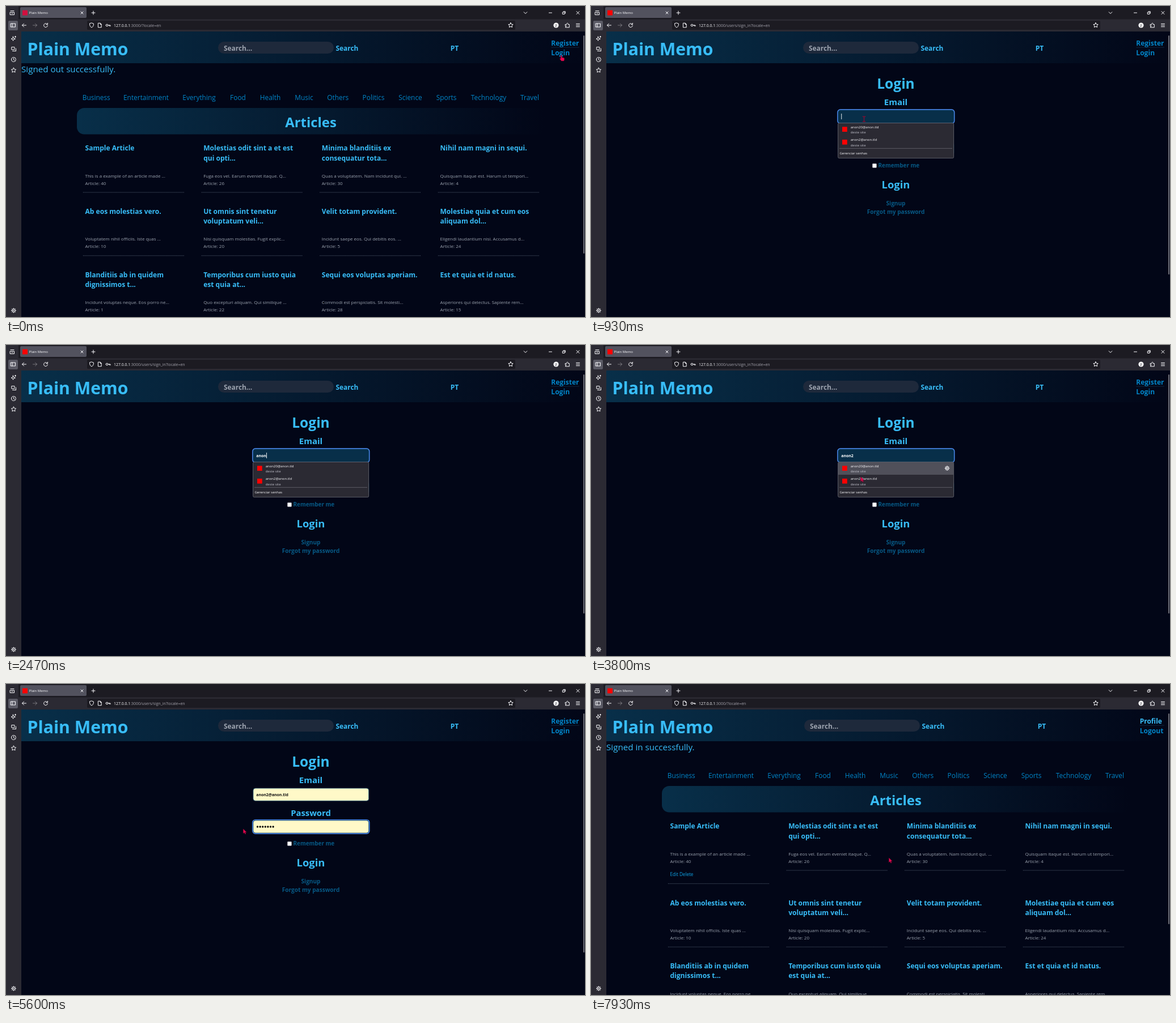
These frames come from a looping animation (1021 px wide and 549 px high, 8000 ms). An HTML page:

```html
<!DOCTYPE html>
<html lang="en">
<head>
<meta charset="utf-8">
<title>Plain Memo</title>
<style>
html, body { margin: 0; width: 100%; height: 100%; overflow: hidden; background: #020617; }
svg { display: block; width: 1021px; height: 549px; }
text { font-family: "Open Sans", "Noto Sans", sans-serif; white-space: pre; }
.b { font-weight: 700; }
.m { text-anchor: middle; }
.i { fill: none; stroke: #fbfbfe; stroke-width: 1; stroke-linecap: round; stroke-linejoin: round; }
</style>
</head>
<body>
<svg id="stage" viewBox="0 0 1021 549" xmlns="http://www.w3.org/2000/svg"></svg>
<script>
const LOOP = 8000;
const SKY = '#38bdf8', LINK = '#0284c7', DEEP = '#075985', GREY = '#9ca3af';
const BAR = '#2b2a33', DARK = '#1c1b22', WHITE = '#fbfbfe';

const text = (x, y, s, size, fill, cls = '') =>
  `<text x="${x}" y="${y}" font-size="${size}" fill="${fill}" class="${cls}">${s}</text>`;
const rect = (x, y, w, h, fill, r = 0, more = '') =>
  `<rect x="${x}" y="${y}" width="${w}" height="${h}" rx="${r}" fill="${fill}" ${more}/>`;
const icon = (x, y, d, more = '') =>
  `<path class="i" transform="translate(${x} ${y})" d="${d}" ${more}/>`;
const group = (id, body, more = '') => `<g id="${id}" ${more}>${body}</g>`;
const circle = (r, x = 0, y = 0) => `M${x - r} ${y}a${r} ${r} 0 1 0 ${2 * r} 0a${r} ${r} 0 1 0 ${-2 * r} 0`;

function star(r) {
  let d = '';
  for (let k = 0; k < 10; k++) {
    const a = k * Math.PI / 5 - Math.PI / 2, q = k % 2 ? r * 0.5 : r;
    d += (k ? 'L' : 'M') + (q * Math.cos(a)).toFixed(2) + ' ' + (q * Math.sin(a)).toFixed(2);
  }
  return d + 'Z';
}

function gear(x, y) {
  let d = circle(1.3) + circle(3);
  for (let k = 0; k < 8; k++) {
    const c = Math.cos(k * Math.PI / 4), s = Math.sin(k * Math.PI / 4);
    d += `M${3 * c} ${3 * s}L${4 * c} ${4 * s}`;
  }
  return icon(x, y, d, 'stroke-width=".8"');
}

function browser() {
  return rect(0, 0, 1021, 24, DARK) + rect(0, 0, 22, 24, BAR) +
    rect(0, 23.5, 1021, 21.5, BAR) + rect(0, 23.5, 27, 526, BAR) +
    rect(25, 2, 117, 19, '#52525e', 2) + rect(143, 26, 755, 16, DARK, 2) +
    rect(4, 26, 17, 17, '#5b5b66', 2) +
    rect(29, 7.5, 9, 9, '#f00', 0, 'id="favicon"') +
    text(40.5, 14.2, 'Plain Memo', 6.05, WHITE) +
    icon(11, 12, 'M-3.5 -1H3.5V3.5H-3.5ZM-3 -3.5H3M-1 1H1') +
    icon(12.5, 34, 'M-4 -3H4V3H-4ZM-1.5 -3V3') +
    icon(134, 12, 'M-2 -2L2 2M2 -2L-2 2') +
    icon(154, 12, 'M-3 0H3M0 -3V3') +
    icon(916, 12, 'M-2.8 -1.3L0 1.5L2.8 -1.3') +
    icon(960, 12, 'M-2.5 0H2.5') +
    icon(984, 12, 'M-2.3 -1H1V2.3H-2.3ZM-1 -2.3H2.3V1') +
    icon(1008.5, 12, 'M-2.5 -2.5L2.5 2.5M2.5 -2.5L-2.5 2.5') +
    icon(32, 34, 'M3.5 0H-3.5M-.5 -3L-3.5 0L-.5 3') +
    icon(51, 34, 'M-3.5 0H3.5M.5 -3L3.5 0L.5 3', 'opacity=".35"') +
    icon(70, 34, 'M2.8 -1.8A3.4 3.4 0 1 0 3.4 .6M3.4 -3.8V-1.3H.9') +
    icon(151, 34, 'M0 -4L3.5 -2.8C3.5 1 2.5 2.7 0 4C-2.5 2.7 -3.5 1 -3.5 -2.8Z') +
    icon(165.5, 34, 'M-2.7 -3.8H.8L2.7 -1.8V3.8H-2.7ZM.6 -3.6V-1.6H2.6') +
    icon(180, 34, circle(1.8, -2) + 'M0 0H4V1.6M2.3 0V1.4') +
    icon(890, 34, star(4.4)) +
    `<circle cx="970" cy="34" r="4.6" fill="${WHITE}"/>` +
    text(970, 36.2, 'J', 6, DARK, 'b m') +
    icon(990, 34, 'M-3.5 -1.5H-1.2C-2 -4.5 2 -4.5 1.2 -1.5H3.3V3.8H-3.5V2C-1 2.3 -1 .2 -3.5 .6Z') +
    icon(1008.5, 34, 'M-3 -2.6H3M-3 0H3M-3 2.6H3') +
    icon(13.5, 57, 'M-1 -3L0 0L3 1L0 2L-1 4.3L-2 2L-4.3 1L-2 0ZM3 -3.8V-1.6M1.9 -2.7H4.1') +
    icon(14, 76, 'M-3.8 -3.5H1V1H-3.8ZM3.5 -1V3.5H-2.5M-1.5 3.5H3.5') +
    icon(13.5, 94.5, circle(3.9) + 'M0 -2.2V.3L1.6 1.2') +
    icon(13.5, 113.5, star(4.4)) +
    gear(13.5, 537.5);
}

function header(user) {
  const d = user ? 2 : 0, [first, second] = user ? ['Profile', 'Logout'] : ['Register', 'Login'];
  const x = user ? 967.7 : 961.3;
  return rect(27, 45, 994, 56, 'url(#fade)') +
    text(37.5, 87, 'Plain Memo', 30.2, SKY, 'b') +
    rect(374 + d, 63, 204, 21, '#1e293b', 10.5) +
    text(384 + d, 78.8, 'Search...', 11.9, GREY, 'b') +
    text(581.5 + d, 78.8, 'Search', 11.9, SKY, 'b') +
    text(user ? 787.7 : 783.7, 78.8, 'PT', 12, SKY, 'b') +
    text(x, 69.9, first, 12, user ? SKY : LINK, 'b') +
    rect(x, 72.6, 1011 - x, 0.7, '#17344c') +
    text(x, 87.3, second, 12.1, LINK, 'b');
}

const scrollbar = end => rect(1018, 52, 2, end - 52, '#6f7079', 1);

const TOPICS = { Business: 159.3, Entertainment: 247, Everything: 340.5, Food: 409, Health: 466,
  Music: 525.5, Others: 585.3, Politics: 648, Science: 713, Sports: 776.5, Technology: 851, Travel: 923.5 };

// title lines | excerpt | article number
const CARDS = [
  'Sample Article||This is a example of an article made ...|40',
  'Molestias odit sint a et est|qui opti...|Fuga eos vel. Earum eveniet itaque. Q...|26',
  'Minima blanditiis ex|consequatur tota...|Quas a voluptatem. Nam incidunt qui. ...|30',
  'Nihil nam magni in sequi.||Quisquam itaque est. Harum ut tempori...|4',
  'Ab eos molestias vero.||Voluptatem nihil officiis. Iste quas ...|10',
  'Ut omnis sint tenetur|voluptatum veli...|Nisi quisquam molestias. Fugit explic...|20',
  'Velit totam provident.||Incidunt saepe eos. Qui debitis eos. ...|5',
  'Molestiae quia et cum eos|aliquam dol...|Eligendi laudantium nisi. Accusamus d...|24',
  'Blanditiis ab in quidem|dignissimos t...|Incidunt voluptas neque. Eos porro ne...|1',
  'Temporibus cum iusto quia|est quia at...|Quo excepturi aliquam. Qui similique ...|22',
  'Sequi eos voluptas aperiam.||Commodi est perspiciatis. Sit molesti...|28',
  'Est et quia et id natus.||Asperiores qui delectus. Sapiente rem...|15'
];

function card(s, k, user) {
  const [a, b, excerpt, n] = s.split('|');
  const row = Math.floor(k / 4), x = 139.5 + k % 4 * 208.65;
  const y = row * 111.75 + (user && row ? 23.4 : 0);
  const own = user && k === 0, line = y + 329 + (own ? 23.4 : 0);
  return text(x, y + 255.4, a, 12.05, SKY, 'b') + text(x, y + 272.5, b, 12.05, SKY, 'b') +
    text(x, y + 302.7, excerpt, 8, GREY) + text(x, y + 315.5, 'Article: ' + n, 8, GREY) +
    (own ? text(x, 338.9, 'Edit Delete', 8.1, '#0ea5e9') : '') +
    `<path d="M${x - 3.5} ${line}h178" stroke="#586577" stroke-width="1" stroke-dasharray="1 1.13"/>`;
}

const home = user => header(user) +
  text(27, 117.2, user ? 'Signed in successfully.' : 'Signed out successfully.', 15.15, SKY) +
  Object.entries(TOPICS).map(([s, x]) => text(x, 166, s, 11.9, LINK, 'm')).join('') +
  rect(125, 180, 825, 46.5, 'url(#fade)', 13) +
  text(537.5, 213.6, 'Articles', 23.9, SKY, 'b m') +
  CARDS.map((s, k) => card(s, k, user)).join('') +
  scrollbar(user ? 424 : 437);

const field = (id, y) =>
  rect(435.9, y, 203.8, 22.3, '#082f49', 4, `id="${id}" stroke="#0c4a6e" stroke-width=".8"`) +
  rect(434.8, y - 1.2, 206, 24.7, 'none', 5, `id="${id}Ring" stroke="#4f8ff7" stroke-width="1.4"`);

function bullets() {
  let s = '';
  for (let k = 0; k < 7; k++) s += `<circle cx="${443.5 + k * 4.6}" cy="252" r="1.65"/>`;
  return group('dots', s);
}

const login = () => header(false) +
  text(537.5, 145.8, 'Login', 24.5, SKY, 'b m') +
  text(537.5, 174.6, 'Email', 15, SKY, 'b m') +
  field('email', 184) +
  text(441.3, 197.8, '', 6.9, '#fff', 'b').replace('<text', '<text id="value"') +
  rect(0, 190, 0.9, 10, '#fff', 0, 'id="caret"') +
  text(537.5, 233, 'Password', 14.8, SKY, 'b m') +
  field('pass', 240.8) + bullets() +
  rect(496.3, 278.3, 7.2, 7.2, '#fff', 1.2, 'stroke="#8f8f9d" stroke-width=".6"') +
  text(506.5, 285.1, 'Remember me', 9.95, DEEP, 'b') +
  text(537.5, 321.8, 'Login', 18.4, SKY, 'b m') +
  text(537.5, 351.6, 'Signup', 10.1, DEEP, 'b m') +
  text(537.5, 366.6, 'Forgot my password', 10.1, DEEP, 'b m') +
  scrollbar(474);

const option = (y, s) => rect(443, y + 6.8, 8.7, 8.7, '#f00') +
  text(457.7, y + 9, s, 6, WHITE) + text(457.7, y + 18.6, 'deste site', 6, '#bfbfc9');

const menu = () =>
  rect(435.6, 206.6, 204, 62, BAR, 2, 'stroke="#65656f" stroke-width=".9"') +
  group('hover', rect(436, 207, 203.2, 22, '#50505a') + gear(628, 217.5)) +
  option(206.5, 'anon20@anon.tld') + option(229.1, 'anon2@anon.tld') +
  rect(438, 250.9, 199, 0.8, '#65656f') +
  text(438.5, 262, 'Gerenciar senhas', 6, WHITE);

const PINK = '#e8064f';
const pointers =
  group('arrow', '<path d="M0 0V8.2L2 6.5L3.4 9.4L4.8 8.8L3.4 6H6Z"/>', `fill="${PINK}" stroke="#5c0a26" stroke-width=".4"`) +
  group('hand', '<path d="M-1.3 .8Q-.4 -.4 .5 .8V4L4.2 5Q5.6 5.6 5.2 7.5L4.4 10.6H-.2L-3 6.8Q-2.6 5.5 -1.3 6.6Z"/>', `fill="${PINK}" stroke="#5c0a26" stroke-width=".4"`) +
  group('beam', '<path d="M-2.7 -4.3H-.8L0 -3.7L.8 -4.3H2.7M0 -3.7V3.9M-2.7 4.4H-.8L0 3.9L.8 4.4H2.7"/>', 'fill="none" stroke="#7d1034" stroke-width="1.5"');

const stage = document.getElementById('stage');
stage.innerHTML =
  `<defs><linearGradient id="fade"><stop stop-color="#082f49"/><stop offset="1" stop-color="#020617"/></linearGradient></defs>` +
  rect(0, 0, 1021, 549, '#020617') +
  group('out', home(false)) + group('form', login()) + group('in', home(true)) +
  browser() +
  `<text x="190" y="36.8" font-size="6.93" fill="${WHITE}">127.0.0.1<tspan id="path" fill="#a3a2ab"></tspan></text>` +
  rect(27, 45, 0, 2, '#1c6fd6', 0, 'id="load"') +
  group('status', rect(27, 538, 114.5, 11, BAR, 1, 'stroke="#4a4953" stroke-width=".7"') +
    text(29.5, 546, '127.0.0.1:3000/users/sign_in?locale=en', 6.05, '#d0d0d6')) +
  group('menu', menu()) +
  group('pointer', pointers);

const el = {};
stage.querySelectorAll('[id]').forEach(n => el[n.id] = n);
const show = (id, on) => el[id].setAttribute('display', on ? 'inline' : 'none');
const set = (id, name, v) => el[id].setAttribute(name, v);
const within = (t, a, b) => t >= a && t < b;

// time, x, y of the pointer
const TRACK = [
  [470, 979.5, 86.5], [800, 481.5, 199.5], [3690, 481.5, 205], [3800, 475.7, 232.7],
  [3930, 481.5, 245.5], [4330, 481.5, 245.5], [4530, 489, 252], [5140, 489, 252],
  [5400, 415.5, 249.5], [5540, 415.5, 249.5], [5730, 427, 275], [6010, 427, 275],
  [6330, 543.7, 314], [7810, 543.7, 314], [7930, 525.3, 306.8]
];

function pointerAt(t) {
  const k = TRACK.findIndex(p => p[0] > t);
  if (k === 0) return TRACK[0].slice(1);
  if (k < 0) return TRACK[TRACK.length - 1].slice(1);
  const [a, x, y] = TRACK[k - 1], [b, u, v] = TRACK[k];
  // the pointer rests in the email field until typing hides it
  if (t < 1930 && t >= 800) return [x, y];
  const p = (t - a) / (b - a), e = p * p * (3 - 2 * p);
  return [x + (u - x) * e, y + (v - y) * e];
}

const TYPED = [1930, 2070, 2270, 2470, 2800];
const ADDRESS = 'anon2@anon.tld';

function draw(t) {
  const formOn = within(t, 270, 7400), filled = t >= 4130;
  show('out', t < 270);
  show('form', formOn);
  show('in', t >= 7400);
  set('favicon', 'fill', t < 270 ? '#d20f3f' : '#f00');
  el.path.textContent = within(t, 270, 7270) ? ':3000/users/sign_in?locale=en' : ':3000/?locale=en';
  show('status', within(t, 70, 540));
  set('load', 'width', within(t, 7070, 7270) ? 100 : within(t, 7270, 7400) ? 600 : 0);

  const count = filled ? ADDRESS.length : TYPED.filter(s => t >= s).length;
  el.value.textContent = ADDRESS.slice(0, count);
  set('value', 'fill', filled ? '#111' : '#fff');
  for (const id of ['email', 'pass']) set(id, 'fill', filled ? '#fff9c8' : '#082f49');
  show('emailRing', t < 4530);
  show('passRing', within(t, 4530, 6470));
  show('dots', filled);

  const caretOn = t < 1730 || within(t, 1930, 3330) || within(t, 3870, 4530);
  show('caret', caretOn);
  set('caret', 'fill', filled ? '#111' : '#fff');
  if (formOn) set('caret', 'x', 441.3 + (count ? el.value.getComputedTextLength() + 0.2 : 0));

  const menuOn = within(t, 930, 1070) || within(t, 2070, 4130);
  show('menu', menuOn);
  show('hover', t >= 3730);
  set('hover', 'transform', `translate(0 ${t >= 3870 ? 22.6 : 0})`);

  const [x, y] = pointerAt(t);
  const inField = formOn && x > 435 && x < 640 && (within(y, 183, 208) || within(y, 240, 263) && !menuOn);
  const onLink = x > 960 && y < 92;
  show('pointer', !within(t, 1930, 3730));
  set('pointer', 'transform', `translate(${x} ${y})`);
  show('hand', onLink);
  show('beam', inField);
  show('arrow', !onLink && !inField);
  set('beam', 'stroke-width', within(t, 1330, 1930) ? 1.1 : 1.5);
}

function tick() {
  draw(performance.now() % LOOP);
  requestAnimationFrame(tick);
}
tick();
</script>
</body>
</html>
```
